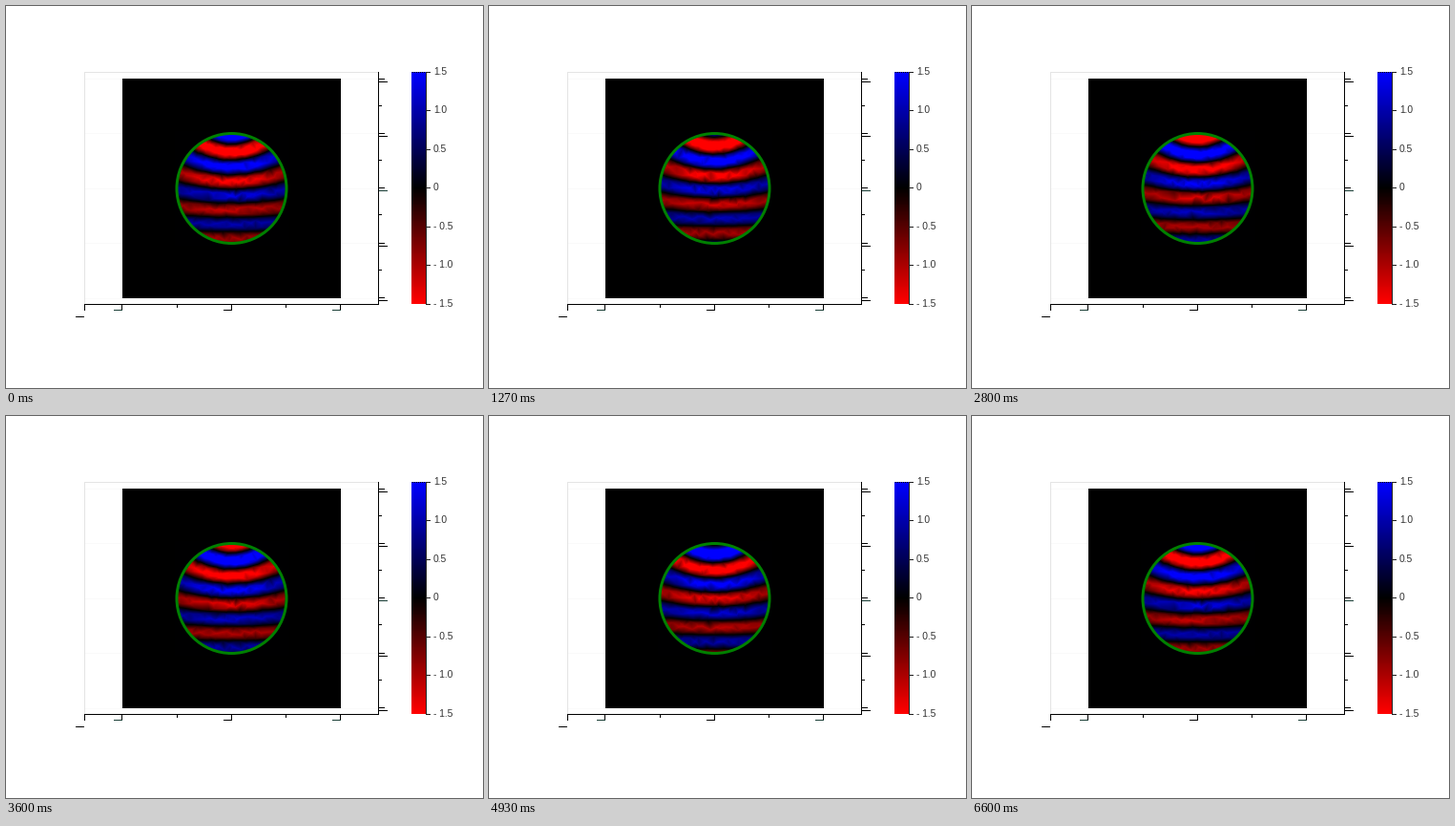
Recreate the animation shown at these times as a matplotlib script. Size 500 by 400 pixels, loop 6670 ms.

```python
import numpy as np
import matplotlib.pyplot as plt
from matplotlib.animation import FuncAnimation
from matplotlib.colors import LinearSegmentedColormap
from matplotlib.patches import Circle, Rectangle
from matplotlib.tri import Triangulation

W, H, DPI = 500, 400, 100
FRAMES, LOOP_MS = 100, 6670
PX = 72 / DPI
CX, CY, R = 236.5, 191, 57.5
WAVELENGTH, CREST = 29.7, 169.3
DARK, TEAL = "#202020", "#1c4038"

cmap = LinearSegmentedColormap.from_list("wave", ["red", "black", "blue"])

fig = plt.figure(figsize=(W / DPI, H / DPI), dpi=DPI, facecolor="white")
ax = fig.add_axes([0, 0, 1, 1])
ax.axis("off")


def box(x, y, w, h, color="black", z=3):
    ax.add_patch(Rectangle((x, y), w, h, color=color, lw=0, zorder=z))


def hline(x0, x1, y, color="black"):
    box(x0, y, x1 - x0, 1, color)


def vline(x, y0, y1, color="black"):
    box(x, y0, 1, y1 - y0, color)


def draw_frame():
    for y in (76, 133, 191, 248, 306):
        box(83, y, 307, 1, "#fafafa", z=1)
    hline(82, 390, 69, "#e4e4e4")
    vline(82, 69, 312, "#e4e4e4")
    box(122, 76, 229, 230, z=2)
    hline(82, 391, 312)
    vline(390, 69, 313)


def draw_ticks():
    vline(82, 313, 319)
    hline(73, 82, 325)
    for x, color in ((121, TEAL), (236, "black"), (350, TEAL)):
        vline(x, 313, 319)
        hline(x - 8, x + 1, 318, color)
    for x in (179, 293):
        vline(x, 313, 316)
    for i in range(5):
        y = int(76 + 57.4 * i)
        hline(391, 397, y)
        hline(391, 400, y + 3, TEAL if i == 2 else "black")
        if i < 4:
            hline(391, 394, y + 28)


def draw_colorbar():
    ramp = np.linspace(1, 0, 256)[:, None]
    ax.imshow(ramp, cmap=cmap, extent=(425, 440, 312, 69), aspect="auto",
              interpolation="bilinear", zorder=2)
    vline(440, 69, 313, DARK)
    for x in range(426, 440, 2):
        hline(x, x + 1, 69)
    for i in range(7):
        value, y = 1.5 - .5 * i, 69 + 40.5 * i
        text = "0" if value == 0 else f"{abs(value):.1f}"
        hline(440, 445, int(y), DARK)
        ax.text(447.8, y + 2.8, ("- " if value < 0 else "") + text, color="#333333",
                family="Liberation Sans", size=10.2 * PX, va="baseline")


def wave_nodes(x, y):
    """Amplitude and phase of a wave whose fronts flatten on the way down."""
    dx = x - CX
    y0 = y.copy()
    for _ in range(15):
        y0 = y + .0085 * np.exp(-(y0 - 152) / 32).clip(0, 1.5) * dx**2
    spread = 72 + .9 * np.maximum(y0 - 180, 0)
    amp = 1.5 * (.62 + .82 * np.exp(-((y0 - 138) / 62) ** 2))
    stretch = 5 * np.exp(-(y0 - 134) / 14).clip(0, 1.5)
    phase = 2 * np.pi * (y0 + stretch - CREST) / WAVELENGTH
    return amp * np.exp(-(dx / spread) ** 2), phase


def make_mesh(step=6):
    rng = np.random.default_rng(4)
    gy, gx = np.mgrid[-13:14, -12:13]
    x = CX + step * (gx + .5 * (gy % 2)).ravel()
    y = CY + step * .87 * gy.ravel()
    x, y = (c + rng.uniform(-.4, .4, c.size) * step for c in (x, y))
    return Triangulation(x, y)


def pixel_weights(mesh, px, py):
    """Corner indices and barycentric weights for each pixel."""
    corners = mesh.triangles[mesh.get_trifinder()(px, py)]
    (xa, xb, xc), (ya, yb, yc) = mesh.x[corners].T, mesh.y[corners].T
    det = (yb - yc) * (xa - xc) + (xc - xb) * (ya - yc)
    wa = ((yb - yc) * (px - xc) + (xc - xb) * (py - yc)) / det
    wb = ((yc - ya) * (px - xc) + (xa - xc) * (py - yc)) / det
    return corners, np.stack([wa, wb, 1 - wa - wb], axis=1)


draw_frame()
draw_ticks()
draw_colorbar()

LEFT, TOP, SIZE = 177, 131, 120
gy, gx = np.mgrid[0:SIZE, 0:SIZE] + .5
px, py = gx + LEFT, gy + TOP
inside = np.hypot(px - CX, py - CY) < R
mesh = make_mesh()
corners, weights = pixel_weights(mesh, px[inside], py[inside])
amp, phase = wave_nodes(mesh.x, mesh.y)

field = np.zeros((SIZE, SIZE))
image = ax.imshow(field, cmap=cmap, vmin=-1.5, vmax=1.5, aspect="auto",
                  extent=(LEFT, LEFT + SIZE, TOP + SIZE, TOP),
                  interpolation="nearest", zorder=4)
ax.add_patch(Circle((CX, CY), R, fill=False, ec="green", lw=3 * PX, zorder=5))
ax.set_xlim(0, W)
ax.set_ylim(H, 0)


def update(n):
    nodes = amp * np.cos(phase + 2 * np.pi * n / (FRAMES - 1))
    field[inside] = (nodes[corners] * weights).sum(axis=1)
    image.set_data(field)
    return [image]


anim = FuncAnimation(fig, update, frames=FRAMES, interval=LOOP_MS / FRAMES,
                     repeat=True, repeat_delay=0, blit=False)
plt.show()
```
